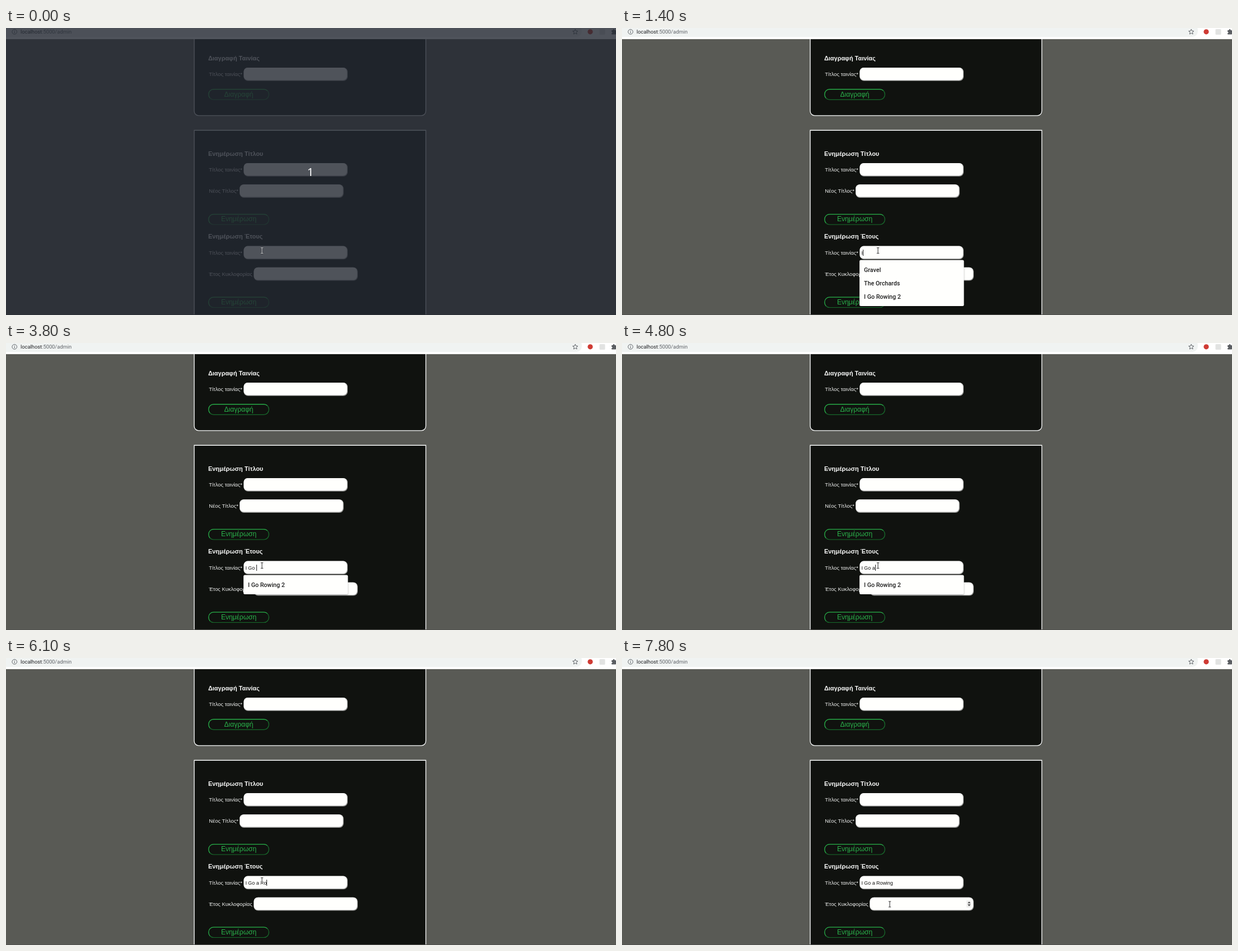
These frames come from a looping animation (1089x514 px, 8000 ms). An HTML page with a canvas:

```html
<!DOCTYPE html>
<html lang="el">
<head>
<meta charset="utf-8">
<title>Admin form</title>
<style>
  html, body { margin: 0; width: 100%; height: 100%; overflow: hidden; background: #595a55; }
  canvas { display: block; width: 1089px; height: 514px; }
</style>
</head>
<body>
<canvas id="stage" width="1089" height="514"></canvas>
<script>
const ctx = document.getElementById('stage').getContext('2d');
const W = 1089, H = 514, LOOP = 8000;
const SANS = '"Liberation Sans", Arial, sans-serif';
const UI = 'Roboto, sans-serif';
const WHITE = '#fffffd';

const typed = 'I Go a Rowing';
const options = ['Gravel', 'The Orchards', 'I Go Rowing 2'];
// [time, characters shown]; every entry also restarts the caret blink
const keys = [[500, 0], [1400, 1], [1500, 1], [2300, 2], [3100, 3], [3600, 4], [3800, 5],
  [4800, 6], [5200, 7], [5500, 8], [6100, 9], [6300, 10], [6400, 11], [6600, 12], [6900, 13]];
// [time, x, y] of the pointer
const moves = [[0, 457, 398.5], [7500, 459, 402], [7600, 466, 411], [7700, 474, 433], [7800, 478, 441]];

const latest = (list, t) => list.filter(e => e[0] <= t).pop();

function text(str, x, y, font, color, align = 'left') {
  ctx.font = font;
  ctx.fillStyle = color;
  ctx.textAlign = align;
  ctx.fillText(str, x, y);
}

function rect(x, y, w, h, color) {
  ctx.fillStyle = color;
  ctx.fillRect(x, y, w, h);
}

function round(x, y, w, h, r, color) {
  ctx.beginPath();
  ctx.roundRect(x, y, w, h, r);
  ctx.fillStyle = color;
  ctx.fill();
}

function disc(x, y, r, color) {
  ctx.beginPath();
  ctx.arc(x, y, r, 0, Math.PI * 2);
  ctx.fillStyle = color;
  ctx.fill();
}

function shape(points, color) {
  ctx.beginPath();
  points.forEach(p => ctx.lineTo(...p));
  ctx.closePath();
  ctx.fillStyle = color;
  ctx.fill();
}

function star(cx, cy, r) {
  ctx.beginPath();
  for (let i = 0; i < 10; i++) {
    const a = -Math.PI / 2 + i * Math.PI / 5, d = i % 2 ? r * 0.45 : r;
    ctx.lineTo(cx + d * Math.cos(a), cy + d * Math.sin(a));
  }
  ctx.closePath();
  ctx.strokeStyle = '#5f6368';
  ctx.lineWidth = 1;
  ctx.stroke();
}

function toolbar() {
  rect(0, 0, W, 20, '#ffffff');
  round(-20, -6, 1048, 22, 10, '#f0f3f2');
  ctx.beginPath();
  ctx.arc(15.2, 6.8, 4.3, 0, Math.PI * 2);
  ctx.strokeStyle = '#5f6368';
  ctx.lineWidth = 1;
  ctx.stroke();
  rect(14.7, 6.2, 1.1, 3, '#5f6368');
  rect(14.7, 4.2, 1.1, 1.1, '#5f6368');
  const font = '9.33px ' + UI, host = 'localhost';
  text(host, 26, 10, font, '#202124');
  text(':5000/admin', 26 + ctx.measureText(host).width, 10, font, '#5f6368');
  star(1016.3, 7, 4.9);
  disc(1043, 6.8, 4.6, '#cf3b34');
  round(1059.5, 2, 10, 10, 1.5, '#e2e3e2');
  round(1081, 4, 8, 7.6, 1, '#5a5d61');
  disc(1085, 3.7, 1.6, '#5a5d61');
  disc(1081.2, 8, 1.3, '#ffffff');
}

function panel(y, bottom, r) {
  ctx.beginPath();
  ctx.roundRect(336, y, 413.5, bottom - y, [0, 0, r, r]);
  ctx.fillStyle = '#10120f';
  ctx.fill();
  ctx.strokeStyle = '#f8fafa';
  ctx.lineWidth = 1.35;
  ctx.stroke();
}

const heading = (str, y) => text(str, 361, y, 'bold 10.92px ' + SANS, '#f8f9f8');

function field(label, x, y) {
  text(label, 362.3, y + 15.2, '9.33px ' + SANS, '#f1f2f1');
  round(x, y, 185.6, 23.7, 7.5, '#9b9c9a');
  round(x, y, 184.4, 22.4, 7, WHITE);
}

function button(label, y) {
  const x = 361, w = 109, h = 20;
  const edge = (points, color) => {
    ctx.save();
    ctx.beginPath();
    points.forEach(p => ctx.lineTo(...p));
    ctx.clip();
    ctx.beginPath();
    ctx.roundRect(x + 0.7, y + 0.7, w - 1.4, h - 1.4, 9);
    ctx.strokeStyle = color;
    ctx.lineWidth = 1.35;
    ctx.stroke();
    ctx.restore();
  };
  edge([[x, y], [x + w, y], [x + w - 10, y + 10], [x + 10, y + 10], [x, y + h]], '#27ab47');
  edge([[x + w, y + h], [x, y + h], [x + 10, y + 10], [x + w - 10, y + 10], [x + w, y]], '#17682b');
  text(label, x + w / 2, y + 13.6, '12px ' + SANS, '#2ab34b', 'center');
}

function page() {
  rect(0, 0, W, H, '#595a55');
  panel(-20, 156.8, 8);
  panel(183.2, 540, 0);
  heading('Διαγραφή Ταινίας', 58);
  field('Τίτλος ταινίας*', 424.4, 71);
  button('Διαγραφή', 109);
  heading('Ενημέρωση Τίτλου', 229);
  field('Τίτλος ταινίας*', 424.4, 242);
  field('Νέος Τίτλος*', 417.2, 280.2);
  button('Ενημέρωση', 332.8);
  heading('Ενημέρωση Έτους', 377);
  field('Τίτλος ταινίας*', 424.4, 390.6);
  field('Έτος Κυκλοφορίας', 442.4, 428.8);
  button('Ενημέρωση', 481.3);
  toolbar();
  rect(0, 513, W, 1, '#50504d');
}

function entry(t) {
  const key = latest(keys, t);
  if (!key) return;
  const str = typed.slice(0, key[1]);
  text(str, 427.4, 405.6, '8.89px ' + SANS, '#111');
  const x = 427.4 + ctx.measureText(str).width;
  if (t < 7500 && t - key[0] < 600) rect(Math.round(x), 397, 1, 11, '#222');
}

function dropdown(t) {
  if (t < 500 || t >= 5200) return;
  const items = t < 1500 ? options : options.slice(2);
  const h = 34.5 + 24 * (items.length - 1);
  const [alpha, scale] = t < 4900 ? [1, 1] : t < 5000 ? [0.55, 0.98] : [0.08, 0.955];
  ctx.save();
  ctx.globalAlpha = alpha;
  ctx.translate(517.2, 415.6 + h / 2);
  ctx.scale(scale, scale);
  ctx.translate(-517.2, -415.6 - h / 2);
  ctx.shadowColor = 'rgba(0,0,0,.35)';
  ctx.shadowBlur = 2.5;
  ctx.shadowOffsetY = 0.8;
  round(424, 415.6, 186.4, h, 2.5, WHITE);
  ctx.shadowColor = 'transparent';
  items.forEach((s, i) => text(s, 432, 436.8 + 24 * i, '500 10.67px ' + UI, '#1d1d1d'));
  ctx.restore();
}

function spinner() {
  rect(615, 434.2, 8.6, 12.6, '#efefee');
  shape([[617, 439.3], [622.4, 439.3], [619.7, 436.2]], '#444');
  shape([[617, 441.3], [622.4, 441.3], [619.7, 444.4]], '#444');
}

function pointer(x, y, core, halo) {
  ctx.beginPath();
  ctx.moveTo(x - 2.2, y - 5);
  ctx.lineTo(x + 2.2, y - 5);
  ctx.moveTo(x, y - 5);
  ctx.lineTo(x, y + 5);
  ctx.moveTo(x - 2.2, y + 5);
  ctx.lineTo(x + 2.2, y + 5);
  for (const [color, width] of [[halo, 2.8], [core, 1.1]]) {
    ctx.strokeStyle = color;
    ctx.lineWidth = width;
    ctx.stroke();
  }
}

function draw(t) {
  page();
  entry(t);
  dropdown(t);
  const [, x, y] = latest(moves, t);
  if (t >= 7700) spinner();
  if (t < 200) {
    rect(0, 0, W, H, 'rgba(36,40,50,.8)');
    text('1', 543.5, 264.5, '20px "Noto Sans", sans-serif', '#fff', 'center');
    pointer(x, y, '#c4c6c8', '#3a3d43');
  } else {
    pointer(x, y, '#3c3c3c', WHITE);
  }
}

const start = performance.now();
function tick() {
  draw((performance.now() - start) % LOOP);
  requestAnimationFrame(tick);
}
tick();
</script>
</body>
</html>
```
